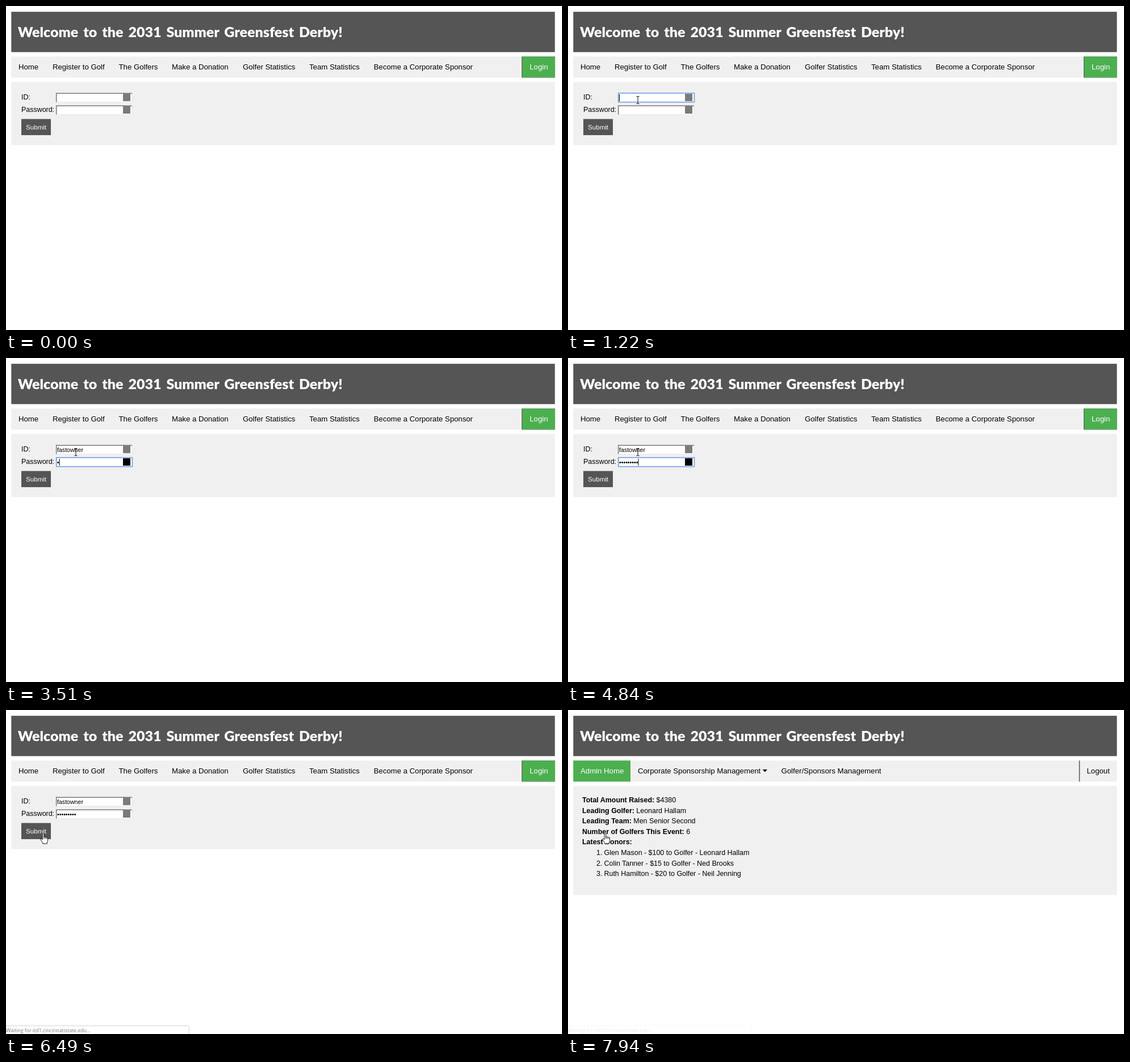
Animation, 979 px wide and 572 px high, one loop 8000 ms. Source, as an HTML page:

```html
<!DOCTYPE html>
<html lang="en">
<head>
<meta charset="utf-8">
<title>Login walkthrough</title>
<style>
  html, body { margin: 0; width: 100%; height: 100%; overflow: hidden; background: #fff; }
  svg { display: block; width: 979px; height: 572px; font: 12.45px "Liberation Sans", Arial, sans-serif; }
  text { white-space: pre; }
  .title { font: 900 25px Lato, sans-serif; word-spacing: 3.2px; fill: #fff; }
  .nav { font-size: 13.2px; }
  .light { fill: #fff; }
  .entry { font-size: 10.6px; }
  .status { font: 8.75px "Open Sans", sans-serif; fill: #777; }
  .bold { font-weight: bold; }
</style>
</head>
<body>
<svg id="stage" viewBox="0 0 979 572">
  <rect x="9.3" y="10.2" width="957.2" height="71.2" fill="#555"/>
  <text class="title" x="21" y="55">Welcome to the 2031 Summer Greensfest Derby!</text>
  <rect x="9.3" y="89.2" width="957.2" height="37.2" fill="#f0f0f0"/>
  <rect id="panel" x="9.3" y="134.2" width="957.2" fill="#f0f0f0"/>

  <g id="login">
    <rect x="908" y="89.2" width="58.5" height="37.2" fill="#555"/>
    <rect x="909" y="89.2" width="57.5" height="37.2" fill="#4caf50"/>
    <text class="nav light" x="922" y="112">Login</text>
    <text x="27" y="165">ID:</text>
    <text x="27" y="187">Password:</text>
    <rect x="27" y="199.5" width="52" height="28.5" fill="#555"/>
    <text class="light" x="35" y="218" font-size="11.6">Submit</text>
  </g>

  <g id="admin">
    <rect x="9.3" y="89.2" width="100.7" height="37.2" fill="#4caf50"/>
    <text class="nav light" x="22" y="112">Admin Home</text>
    <text class="nav" x="123" y="112">Corporate Sponsorship Management</text>
    <path id="drop" d="M342.5 105h8.5l-4.25 4.5z"/>
    <text class="nav" id="second" y="112">Golfer/Sponsors Management</text>
    <rect x="899.8" y="89.2" width="1.5" height="37.2" fill="#555"/>
    <text class="nav" x="913.5" y="112">Logout</text>
  </g>

  <g id="status">
    <path d="M-1 557.5H320q2.5 0 2.5 2.5V573H-1z" fill="#fff" stroke="#d6d6d6"/>
    <text class="status" x="0" y="569">Waiting for itd1.cincinnatistate.edu...</text>
  </g>

  <g id="arrow"><path d="M.5.5V15L3.8 12 6 17 8.2 16 6 11.2H10.6Z" fill="#fff" stroke="#000" stroke-width=".9"/></g>
  <g id="beam"><path d="M-2.5-6.5H-1Q0-6.5 0-5.5 0-6.5 1-6.5H2.5M0-5.5V5.5M-2.5 6.5H-1Q0 6.5 0 5.5 0 6.5 1 6.5H2.5" fill="none" stroke="#111"/></g>
  <g id="hand"><path d="M-1.3 11V1.2Q-1.2 0 0 0T1.3 1.2V6.5Q2.6 5.6 3.8 7 5.2 6.2 6.2 7.6 8 7.2 8 9V13Q8 15 6.8 16.5V18.5H-.8V16.8L-4.6 11.6Q-5.2 10-3.8 9.6-2.6 9.6-1.3 11.4ZM1.3 6.5V10M3.8 7V10M6.2 7.6V10" fill="#fff" stroke="#000" stroke-width=".9" stroke-linejoin="round"/></g>
</svg>
<script>
const LOOP = 8000;
const USER = "fastowner";
const USER_KEYS = [1830, 2060, 2290, 2480, 2640, 2790, 2850, 3020, 3080];
const PASS_KEYS = [3510, 3730, 3880, 4130, 4290, 4500, 4613, 4726, 4840];
// Pointer route: time, x, y
const ROUTE = [
  [70, 813, 533], [300, 610, 410], [550, 240, 235], [754, 69, 176], [830, 81, 171],
  [900, 92, 171], [1060, 112, 168], [1220, 123, 166],
  [5230, 122, 162], [5390, 117, 139], [5620, 92, 166], [5850, 60, 214],
  [5930, 62, 217], [6010, 65, 217], [6489, 65, 217], [6490, 65.5, 217.5]
];

const $ = id => document.getElementById(id);
const show = (id, on) => $(id).style.display = on ? "" : "none";
const typed = (keys, t) => keys.filter(k => k <= t).length;

function add(parent, tag, attrs, text = "") {
  const el = document.createElementNS("http://www.w3.org/2000/svg", tag);
  for (const name in attrs) el.setAttribute(name, attrs[name]);
  el.textContent = text;
  return parent.appendChild(el);
}

function makeField(y) {
  const g = $("login");
  add(g, "rect", { x: 88, y, width: 134, height: 16, fill: "#e8e8e8" });
  add(g, "rect", { x: 89, y: y + 1, width: 132, height: 14.5, fill: "#fff" });
  add(g, "path", { d: `M88.7 ${y + 16}V${y + .8}H222`, fill: "none", stroke: "#7c7c7c", "stroke-width": 1.6 });
  const ring = add(g, "rect", { x: 88.8, y: y + .3, width: 133.6, height: 15.9, fill: "#fff", stroke: "#79a2e6", "stroke-width": 1.7 });
  const icon = add(g, "rect", { x: 206, y: y + 1.5, width: 13, height: 13 });
  const entry = add(g, "text", { class: "entry", x: 90, y: y + 12 });
  const caret = add(g, "rect", { y: y + 2.5, width: 1, height: 12 });
  return (text, focus, blink, dark) => {
    ring.style.display = focus ? "" : "none";
    icon.setAttribute("fill", dark ? "#000" : "#7b7b7b");
    entry.textContent = text;
    caret.style.display = blink ? "" : "none";
    caret.setAttribute("x", 90 + (text ? entry.getComputedTextLength() : 0));
  };
}

const drawUser = makeField(153.5);
const drawPass = makeField(175.5);

[[22, "Home"], [82, "Register to Golf"], [198.5, "The Golfers"], [292, "Make a Donation"],
 [417, "Golfer Statistics"], [534, "Team Statistics"], [647.5, "Become a Corporate Sponsor"]]
  .forEach(([x, label]) => add($("login"), "text", { class: "nav", x, y: 112 }, label));

[["Total Amount Raised:", "$4380"], ["Leading Golfer:", "Leonard Hallam"],
 ["Leading Team:", "Men Senior Second"], ["Number of Golfers This Event:", "6"], ["Latest Donors:", ""]]
  .forEach(([label, value], i) => {
    const line = add($("admin"), "text", { x: 25, y: 163 + i * 18.6 });
    add(line, "tspan", { class: "bold" }, label);
    add(line, "tspan", {}, " " + value);
  });

["Glen Mason - $100 to Golfer - Leonard Hallam", "Colin Tanner - $15 to Golfer - Ned Brooks",
 "Ruth Hamilton - $20 to Golfer - Neil Jenning"].forEach((donor, i) => {
  const y = 256 + i * 18.6;
  add($("admin"), "text", { x: 50, y }, i + 1 + ".");
  add($("admin"), "text", { x: 63.5, y }, donor);
});

// The pointer is sampled at a coarse rate, so it moves in jumps
function sample(t) {
  const [start, step] = t < 900 ? [70, 76] : t < 5230 ? [900, 80] : t < 6010 ? [5230, 78] : [0, 10];
  return start + Math.floor((t - start) / step) * step;
}

function pointer(time) {
  const t = time >= 1220 && time < 5230 ? 1220 : sample(time);
  // The pointer rests between the two moves
  if (t === 1220) return [123, 166];
  const i = ROUTE.findIndex(p => p[0] > t);
  if (i < 0) return ROUTE[ROUTE.length - 1].slice(1);
  const [a, b] = [ROUTE[Math.max(i - 1, 0)], ROUTE[i]];
  const f = (t - a[0]) / (b[0] - a[0] || 1);
  return [a[1] + (b[1] - a[1]) * f, a[2] + (b[2] - a[2]) * f];
}

function draw(t) {
  const admin = t >= 7480, menu = t >= 7560;
  show("login", !admin);
  show("admin", admin);
  $("panel").setAttribute("height", admin ? 192.3 : 111.5);
  show("drop", menu);
  $("second").setAttribute("x", menu ? 375.5 : 378);

  const onUser = t >= 1140 && t < 3260, onPass = t >= 3260 && t < 5930;
  drawUser(USER.slice(0, typed(USER_KEYS, t)), onUser, onUser && !(t >= 1680 && t < 1830), false);
  drawPass("•".repeat(typed(PASS_KEYS, t)), onPass, onPass && !(t >= 5340 && t < 5840), onPass);

  show("status", t >= 6490);
  $("status").style.opacity = t < 7880 ? 1 : t < 7940 ? .55 : .17;

  const kind = t < 70 ? "" : t < 900 ? "arrow" : t < 5386 ? "beam" : t < 5850 ? "arrow" : "hand";
  const [x, y] = pointer(t);
  for (const id of ["arrow", "beam", "hand"]) {
    show(id, id === kind);
    $(id).setAttribute("transform", `translate(${x} ${y})`);
  }
}

const begin = performance.now();
function frame() {
  draw((performance.now() - begin) % LOOP);
  requestAnimationFrame(frame);
}
frame();
</script>
</body>
</html>
```
